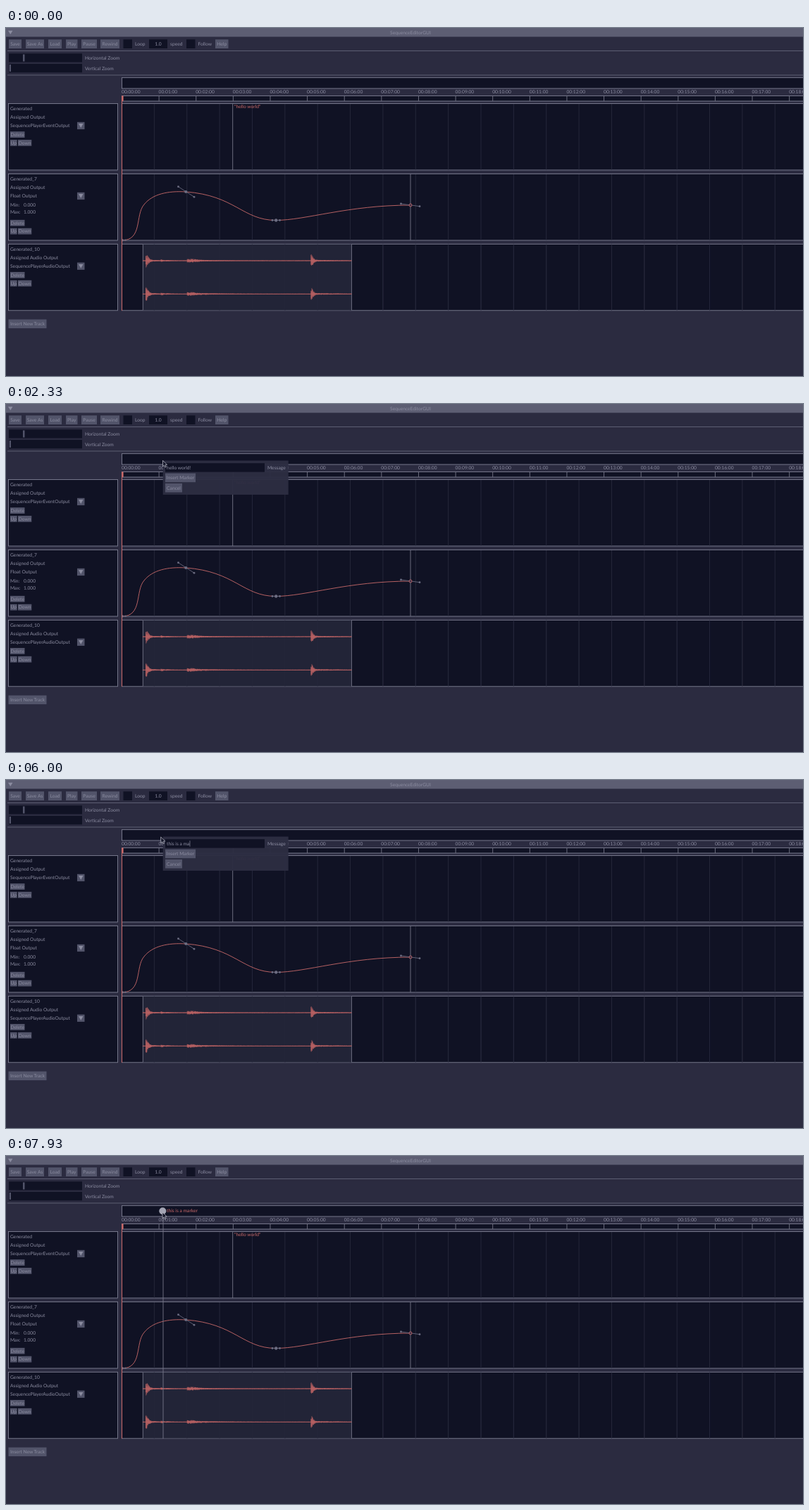
Recreate the animation shown at these times as an HTML page. Size 1131 by 495 pixels, loop 8 s.

```html
<!DOCTYPE html>
<html lang="en">
<head>
<meta charset="utf-8">
<title>Sequence editor</title>
<style>
  html, body { margin: 0; width: 100%; height: 100%; overflow: hidden; background: #2b2b40; }
  svg { display: block; }
  text { font: 6.7px Lato, sans-serif; fill: #8b8ca0; white-space: pre; text-rendering: geometricPrecision; }
  .mid { text-anchor: middle; }
  .dark { fill: #101224; }
  .button { fill: #52546a; }
  .box { fill: #101224; stroke: #8b8ca0; stroke-width: .8; }
  .rule { stroke: #5d5e73; }
  .grid { stroke: #25273a; }
  .edge { stroke: #777889; stroke-width: .9; }
  .red { fill: #c86969; }
  .curve { fill: none; stroke: #c86969; stroke-width: .9; }
  .wave { fill: none; stroke: #c86969; stroke-width: .6; }
  .knob { fill: #6c6d82; }
  .light { fill: #8b8ca0; }
</style>
</head>
<body>
<svg id="stage" width="1131" height="495" viewBox="0 0 1131 495"></svg>
<script>
const LOOP = 8000;
const stage = document.getElementById('stage');

// Markup helpers
const rect = (x, y, w, h, cls) => `<rect x="${x}" y="${y}" width="${w}" height="${h}" class="${cls}"/>`;
const line = (x1, y1, x2, y2, cls) => `<line x1="${x1}" y1="${y1}" x2="${x2}" y2="${y2}" class="${cls}"/>`;
const dot = (x, y, r, cls = 'knob') => `<circle cx="${x}" cy="${y}" r="${r}" class="${cls}"/>`;
const text = (x, y, s, cls = '') => `<text x="${x}" y="${y}" class="${cls}">${s}</text>`;
const path = (d, cls) => `<path d="${d}" class="${cls}"/>`;
const button = (x, y, w, h, s) =>
  rect(x, y, w, h, 'button') + text(x + w / 2, y + h / 2 + 2.3, s, 'mid');
const arrow = (x, y, w, h) => path(`M${x} ${y}h${w}l${-w / 2} ${h}z`, 'light');
const repeat = (n, fn) => Array.from({ length: n }, (_, i) => fn(i)).join('');

function toolbar() {
  const buttons = [[4, 18, 'Save'], [28, 26, 'Save As'], [60, 19, 'Load'], [85, 16.5, 'Play'],
    [107, 22, 'Pause'], [134, 27, 'Rewind'], [297, 18.5, 'Help']];
  return rect(0, 0, 1131, 12.5, 'title') .replace('class="title"', 'fill="#5d5e73"') +
    arrow(3, 3.7, 6.5, 5.3) + text(574, 9, 'SequenceEditorGUI', 'mid') +
    buttons.map(([x, w, s]) => button(x, 16.3, w, 12.7, s)).join('') +
    rect(166.5, 16.3, 12.5, 12.7, 'dark') + text(183, 25, 'Loop') +
    rect(203, 16.3, 26, 12.7, 'dark') + text(216, 25, '1.0', 'mid') + text(233, 25, 'speed') +
    rect(256, 16.3, 12.5, 12.7, 'dark') + text(272.5, 25, 'Follow') +
    line(2, 32.5, 1131, 32.5, 'rule') +
    rect(4, 36.3, 104, 12.3, 'dark') + rect(24, 37.5, 2.5, 10, 'button') + text(112, 45.2, 'Horizontal Zoom') +
    rect(4, 51, 104, 12.3, 'dark') + rect(4.7, 52, 2.3, 10, 'button') + text(112, 59.5, 'Vertical Zoom') +
    line(2, 67, 1131, 67, 'rule');
}

function ruler() {
  return rect(164.5, 70.7, 980, 15.3, 'box') + rect(164.5, 96.4, 980, 7.6, 'box') +
    repeat(19, i => {
      const x = 164 + i * 52.62;
      return text(x, 93.3, `00:${String(i).padStart(2, '0')}:00`) + line(x + .5, 96.5, x + .5, 104, 'edge');
    });
}

function panel(y, name, kind, output, extra = 0) {
  return rect(3.5, y, 155, 94.5, 'box') +
    [name, kind, output].map((s, i) => text(6, y + 9.6 + i * 12, s)).join('') +
    rect(101, y + 26.3, 10.5, 10.3, 'button') + arrow(103, y + 28.6, 6.5, 5.8) +
    button(6, y + 39.7 + extra, 20.5, 8.8, 'Delete') +
    button(6, y + 51.5 + extra, 9.7, 8.8, 'Up') + button(17, y + 51.5 + extra, 19.3, 8.8, 'Down');
}

const grid = y => repeat(20, i => {
  const x = 210.4 + i * 46.36;
  return line(x, y + .5, x, y + 94, 'grid');
});
const lane = y => rect(164.5, y, 980, 94.5, 'box') + grid(y);

function curve() {
  return path('M164.5 302C194 302 183 266 196 251C208 236 230 231.5 255 233' +
      'C325 238 336 273.5 383 273.5C425 273.5 485 252 574 252', 'curve') +
    line(574, 208, 574, 302, 'edge') +
    line(244.5, 225.7, 267, 240.3, 'rule') + dot(244.5, 225.7, 1.4) + dot(267, 240.3, 1.4) + dot(255.3, 233, 2.1) +
    line(378, 273.5, 388.5, 273.5, 'rule') + dot(378, 273.5, 1.4) + dot(388.5, 273.5, 1.4) + dot(383.2, 273.5, 2.2) +
    line(560.5, 250, 587, 253.7, 'rule') + dot(560.5, 250, 1.4) + dot(587, 253.7, 1.4) +
    `<circle cx="574" cy="252" r="2" fill="#3a2f45" stroke="#c86969" stroke-width=".8"/>` +
    dot(165.5, 301.8, 1.6) + dot(169.5, 301.8, 1.3);
}

// Decaying hits plus a thin noise floor
function wave(y, seed) {
  const random = () => (seed = seed * 16807 % 2147483647) / 2147483647;
  const hit = (x, at, amp, fall) => x < at ? 0 : amp * Math.exp(-(((x - at) / fall) ** 1.6));
  let d = `M194 ${y}H490.5`;
  for (let x = 194; x < 490; x += .4) {
    const amp = .45 + hit(x, 198.3, 10, 4) + hit(x, 198.5, 1, 22) + hit(x, 220, 1.5, 3) + hit(x, 227, .6, 6) +
      hit(x, 257, 2.4, 13) + hit(x, 262, .8, 45) + hit(x, 432.4, 10, 4) + hit(x, 434, .8, 35);
    d += `M${x.toFixed(1)} ${(y - amp * (.35 + .65 * random())).toFixed(2)}V${(y + amp * (.35 + .65 * random())).toFixed(2)}`;
  }
  return path(d, 'wave');
}

const tracks =
  panel(107.5, 'Generated', 'Assigned Output', 'SequencePlayerEventOutput') + lane(107.5) +
  line(321.7, 108, 321.7, 202, 'edge') + text(324, 114.4, '"hello world"', 'red') +
  panel(207.5, 'Generated_7', 'Assigned Output', 'Float Output', 25.7) +
  text(6, 253.7, 'Min:') + text(25, 253.7, '0.000') + text(6, 264, 'Max:') + text(25, 264, '1.000') +
  lane(207.5) + curve() +
  panel(307.3, 'Generated_10', 'Assigned Audio Output', 'SequencePlayerAudioOutput') + lane(307.3) +
  `<rect x="194" y="307.8" width="296.5" height="93.6" fill="#222437"/>` + grid(307.3) +
  line(194.3, 308, 194.3, 401.5, 'edge') + line(490.4, 308, 490.4, 401.5, 'edge') +
  wave(331, 11) + wave(378.3, 47);

const marker = `<g id="marker">` + line(223, 80, 223, 402, 'edge') +
  `<circle id="bulb" cx="222.3" cy="78.3" r="5"/>` + text(228, 80.3, 'this is a marker', 'red') + '</g>';

const popup = `<g id="popup"><rect x="222.7" y="80.5" width="178" height="48.5" fill="#2c2d42" opacity=".96"/>` +
  rect(226, 84.2, 141, 12.5, 'dark') + `<rect id="select" y="85.5" height="10" class="button"/>` +
  `<text id="field" x="228" y="93"></text><rect id="caret" y="86.3" width=".7" height="8.4" class="light"/>` +
  text(371, 93, 'Message') + button(226, 98.6, 43, 12.6, 'Insert Marker') +
  button(226, 113, 24, 12.6, 'Cancel') + '</g>';

const cursor = `<path id="cursor" d="M0 0V8.6L2 6.9L3.3 9.8L4.8 9.1L3.6 6.3L6.1 6.1Z"
  fill="#15172a" stroke="#b4b5c2" stroke-width=".8"/>`;

stage.innerHTML = toolbar() + ruler() + tracks + rect(164, 96.5, 2.6, 7.5, 'red') +
  rect(164, 96.5, 1, 305.5, 'red') + marker + popup + cursor +
  button(3.5, 414.5, 54, 12.6, 'Insert New Track');

const [markerEl, bulb, popupEl, select, field, caret, cursorEl] =
  ['marker', 'bulb', 'popup', 'select', 'field', 'caret', 'cursor'].map(id => document.getElementById(id));

// Pointer stops: time, x, y
const stops = [[0, 1121, 312], [830, 234.5, 83.5], [970, 234.5, 83.5], [1230, 218.5, 78.5], [1370, 218.5, 78.5],
  [1430, 222.5, 80.3], [2330, 222.5, 80.3], [2830, 244, 87], [3170, 244, 87], [3400, 267, 88.5], [3450, 267, 88.5],
  [3970, 216.5, 85.5], [4070, 216.5, 85.5], [4200, 219.7, 81], [6870, 219.7, 81], [7030, 278.3, 99.5],
  [7240, 253, 104], [7340, 251, 104], [7670, 236, 86], [7930, 222, 80], [LOOP, 222, 80]];
const typed = 'this is a marker';
const keys = [4600, 4770, 4870, 4970, 5100, 5200, 5300, 5400, 5530, 5670, 5870, 6000, 6100, 6270, 6370, 6430];
const OPEN = 1630, DRAG = 3450, CLOSE = 7340;

function pointer(t) {
  const i = stops.findIndex(s => s[0] > t);
  const [t0, x0, y0] = stops[i - 1], [t1, x1, y1] = stops[i];
  const u = (t - t0) / (t1 - t0), e = u * u * (3 - 2 * u);
  return [x0 + (x1 - x0) * e, y0 + (y1 - y0) * e];
}

const show = (el, on) => el.setAttribute('visibility', on ? 'inherit' : 'hidden');

function draw(t) {
  const [x, y] = pointer(t);
  cursorEl.setAttribute('transform', `translate(${x} ${y})`);
  show(cursorEl, t >= 30);

  const count = keys.filter(k => k <= t).length;
  field.textContent = count ? typed.slice(0, count) : 'hello world!';
  const end = 228 + field.getComputedTextLength();
  const from = Math.min(end, Math.max(228, x));
  select.setAttribute('x', from);
  select.setAttribute('width', end - from);
  caret.setAttribute('x', end + .2);
  show(popupEl, t >= OPEN && t < CLOSE);
  show(select, t >= DRAG && !count);
  show(caret, count > 0);
  if (t < OPEN || t >= CLOSE) [select, caret].forEach(el => show(el, false));

  show(markerEl, t >= CLOSE);
  bulb.setAttribute('fill', Math.hypot(x - 222.3, y - 78.3) < 5 ? '#a3a4b3' : '#8b8ca0');
}

function tick(now) {
  draw(now % LOOP);
  requestAnimationFrame(tick);
}
draw(0);
requestAnimationFrame(tick);
</script>
</body>
</html>
```
